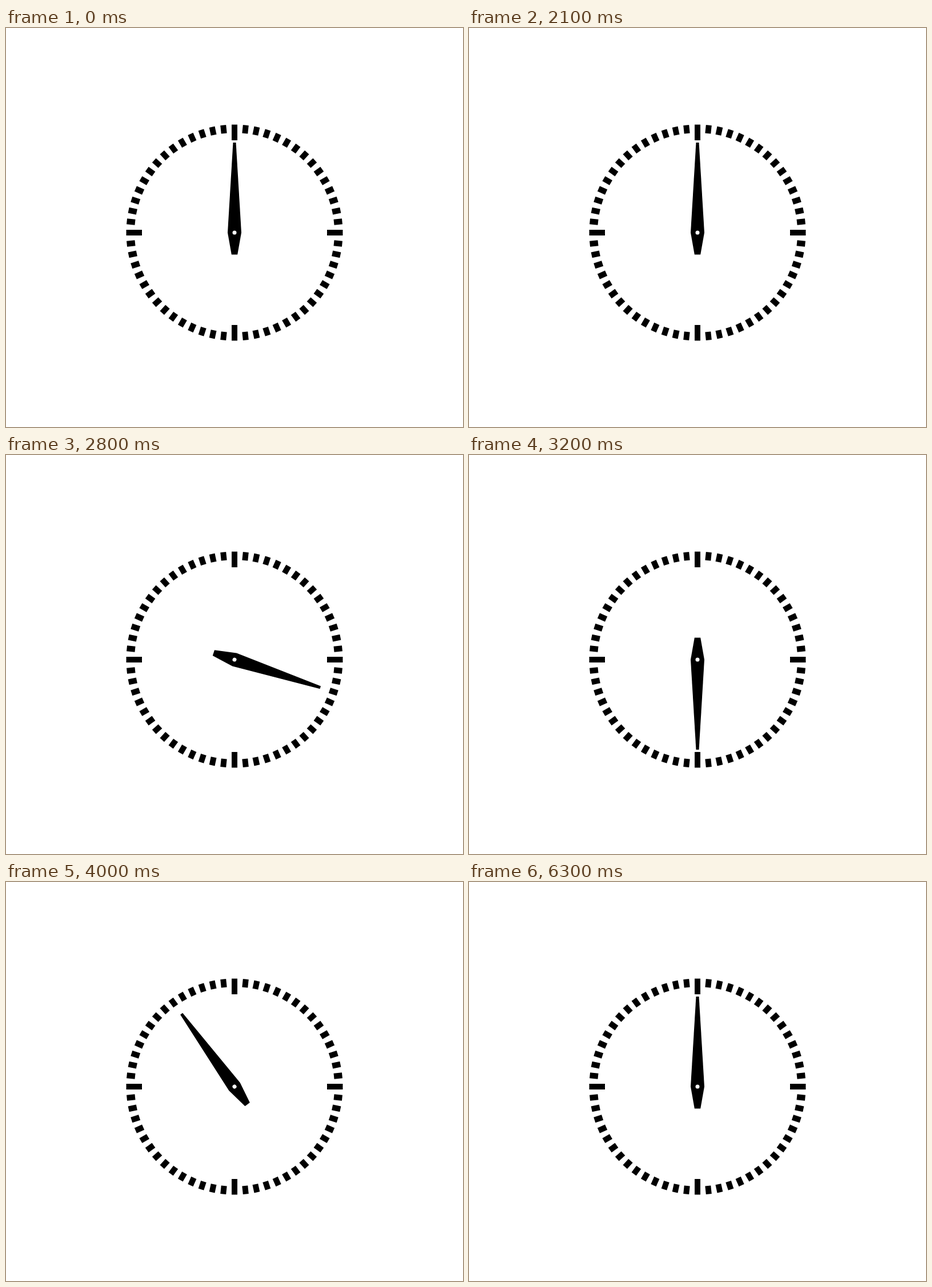
Recreate the animation shown at these times as an HTML page with a canvas. Size 800x700 px, loop 6400 ms.

```html
<!DOCTYPE html>
<html lang="en">
<head>
<meta charset="utf-8">
<title>Rotation range</title>
<style>
  html, body { margin: 0; width: 100%; height: 100%; overflow: hidden; background: #fff; }
  canvas { display: block; }
</style>
</head>
<body>
<canvas id="stage" width="800" height="700"></canvas>
<script>
const ctx = document.getElementById('stage').getContext('2d');
const LOOP = 6400;
const CENTER = { x: 400, y: 359 };
const RED = '#f00';
const FONT = '"Liberation Sans", Arial, sans-serif';

function polygon(...points) {
  ctx.beginPath();
  points.forEach(([x, y]) => ctx.lineTo(x, y));
  ctx.fill();
}

function atAngle(degrees, draw) {
  ctx.save();
  ctx.translate(CENTER.x, CENTER.y);
  ctx.rotate(degrees * Math.PI / 180);
  draw();
  ctx.restore();
}

function drawDial() {
  ctx.fillStyle = '#000';
  for (let i = 0; i < 60; i++) {
    const length = i % 15 ? 14.5 : 27.5;
    atAngle(i * 6, () => ctx.fillRect(-5, -189.5, 10, length));
  }
}

function drawHand(degrees) {
  atAngle(degrees, () => {
    ctx.fillStyle = '#000';
    polygon([-2.5, -158], [2.5, -158], [12, 0], [5.2, 38.5], [-5.2, 38.5], [-12, 0]);
    ctx.fillStyle = '#fff';
    ctx.beginPath();
    ctx.arc(0, 0, 3.5, 0, 2 * Math.PI);
    ctx.fill();
  });
}

function drawLabel(limit, degrees) {
  ctx.fillStyle = RED;
  ctx.font = `bold 25px ${FONT}`;
  ctx.fillText('vrot', 420, 41);
  ctx.font = `26px ${FONT}`;
  ctx.fillText(limit, 473, 41);
  ctx.fillText(`${degrees} degrees`, 419, 71);
  ctx.fillRect(399, 89, 2, 40);
}

function drawFullTurn() {
  const gap = 0.06;
  ctx.strokeStyle = ctx.fillStyle = RED;
  ctx.lineWidth = 2;
  ctx.beginPath();
  ctx.arc(400, 362, 250, -Math.PI / 2 + gap, Math.PI * 1.5 - gap);
  ctx.stroke();
  for (const side of [-1, 1]) {
    polygon([400 + side, 113], [400 + side * 22, 107.5], [400 + side * 22, 119.5]);
  }
}

function render(t) {
  const step = t < 2200 ? 0 : Math.min(20, Math.floor((t - 2200) / 100));
  ctx.fillStyle = '#fff';
  ctx.fillRect(0, 0, 800, 700);
  drawDial();
  drawHand(step * 18);
  if (t >= 100 && t < 2100) drawLabel('Minimum', 0);
  if (t >= 4300 && t < 6300) {
    drawLabel('Maximum', 360);
    drawFullTurn();
  }
}

function tick() {
  render(performance.now() % LOOP);
  requestAnimationFrame(tick);
}
tick();
</script>
</body>
</html>
```
